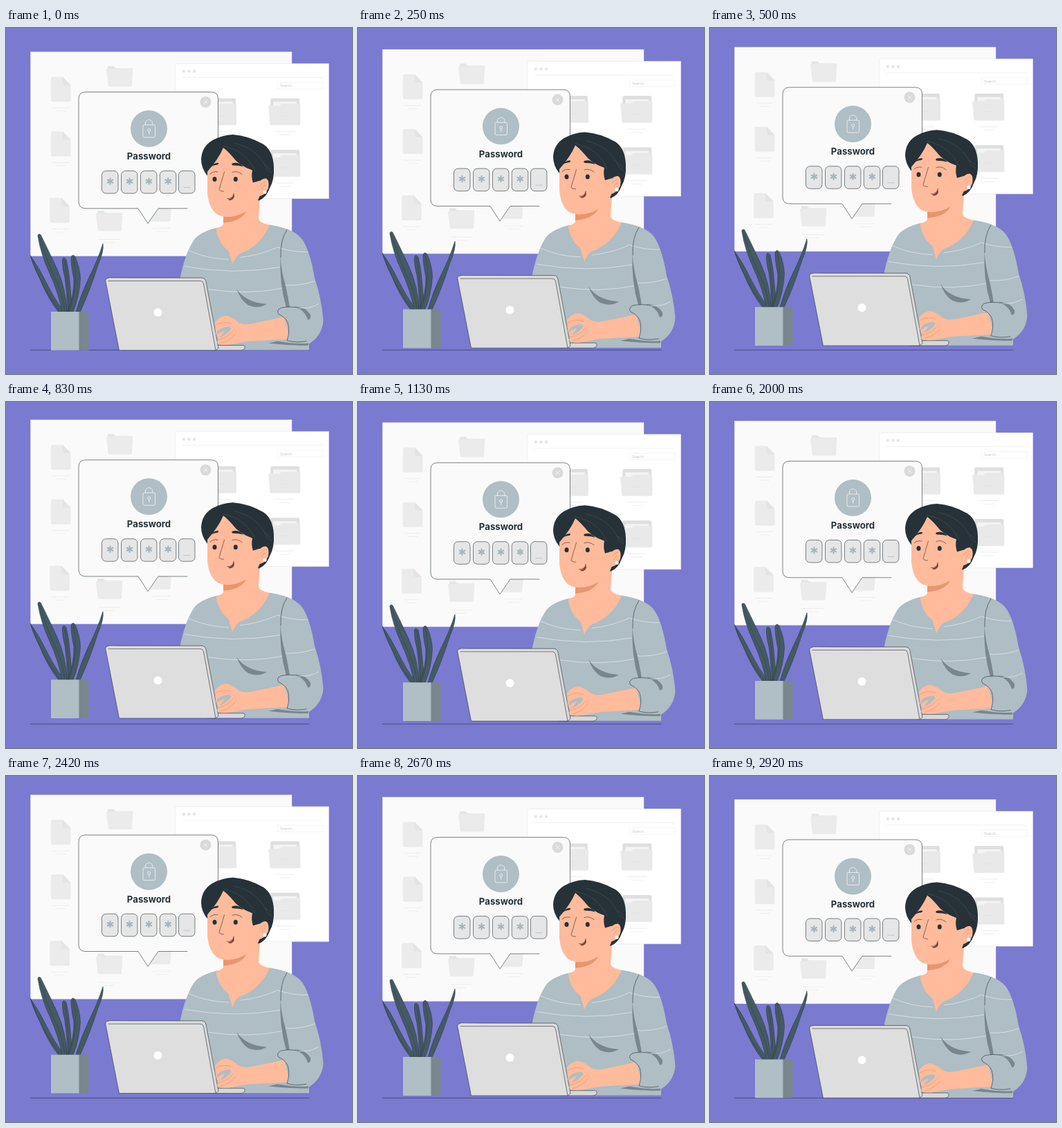
Write an HTML page that moves like this. It is 500 px wide and 500 px high and loops after 2.96 s.

```html
<!DOCTYPE html>
<html lang="en">
<head>
<meta charset="utf-8">
<title>Password</title>
<style>
  html, body { margin: 0; width: 100%; height: 100%; overflow: hidden; background: #7a7ad1; }
  svg { display: block; width: 100%; height: 100%; }
  .ink { fill: none; stroke: #263238; stroke-width: .6; stroke-linecap: round; stroke-linejoin: round; }
  .edge { stroke: #263238; stroke-width: .6; stroke-linejoin: round; }
  .dark { fill: #263238; }
  .skin { fill: #ffbb9b; }
  .shirt { fill: #afbdc4; }
  .shade { fill: #79868d; }
  .stripe { fill: none; stroke: #e6ecef; stroke-width: .7; }
  .rule { stroke: #ebebeb; stroke-width: .9; }
  .leaf { fill: #455a64; stroke: #263238; stroke-width: .5; }
  .white { fill: none; stroke: #fff; stroke-width: .7; }
</style>
</head>
<body>
<svg viewBox="0 0 500 500">
  <defs>
    <g id="file">
      <path fill="#ebebeb" d="M2 0H17L28.500 12V34Q28.500 36 26.500 36H2Q0 36 0 34V2Q0 0 2 0Z"/>
      <path fill="#e4e4e4" d="M17 0V10Q17 12 19 12H28.500Z"/>
      <path class="rule" d="M2 45H26M7 49.500H21"/>
    </g>
    <g id="folder">
      <path fill="#e5e5e5" d="M2 4V1Q2 0 3 0H11L13 3H36V8H2Z"/>
      <path fill="#ebebeb" d="M1 4H14L16 3H37.500Q38.500 3 38.400 4L37 28Q37 29.500 35.500 29.500H4.500Q3 29.500 2.800 28L0 5Q0 4 1 4Z"/>
    </g>
    <g id="docs">
      <path fill="#dfdfdf" d="M5 0H43Q45 0 45 2V37H3V2Q3 0 5 0Z"/>
      <path fill="#f4f4f4" d="M7 5H41V16H7Z"/>
      <path fill="#e9e9e9" d="M1 11H16L19 8H44Q46 8 46 10V37Q46 39 44 39H4Q2 39 2 37L0 12Q0 11 1 11Z"/>
      <path stroke="#e0e0e0" stroke-width=".7" d="M18 26H30"/>
      <path class="rule" d="M10 48H38M16 53H32"/>
    </g>
    <path id="star" d="M0-5V5M-4.400-2.500L4.400 2.500M-4.400 2.500L4.400-2.500" fill="none" stroke="#a6b5bd" stroke-width="2.100"/>
  </defs>

  <path class="ink" d="M35 465.300H438"/>

  <g id="scene">
    <!-- back windows -->
    <path fill="#fafafa" stroke="#e8e8ee" stroke-width=".4" d="M35.500 34H413V329H35.500Z"/>
    <use href="#file" x="65" y="70"/>
    <use href="#file" x="65" y="149"/>
    <use href="#file" x="63.300" y="245"/>
    <use href="#folder" x="145" y="54.500"/>
    <use href="#folder" x="130" y="263.500"/>
    <use href="#folder" x="200.500" y="249.500"/>
    <path class="rule" d="M134 305H165M141 309.500H157M211 289H238M216 293.500H233"/>

    <path fill="#fff" stroke="#e6e6e6" stroke-width=".6" d="M244.500 51H466.500V246H244.500Z"/>
    <g fill="#e6e6e6">
      <circle cx="257" cy="62" r="2.200"/><circle cx="264.500" cy="62" r="2.200"/><circle cx="272" cy="62" r="2.200"/>
    </g>
    <path class="rule" d="M254 71H458" opacity=".7"/>
    <path fill="none" stroke="#ececec" stroke-width=".6" d="M392.500 78H458V87.500H392.500Z"/>
    <text x="396" y="85" font-family="Inter, sans-serif" font-size="5" fill="#c4c4c4">Search...</text>
    <use href="#docs" x="287" y="101"/>
    <use href="#docs" x="379.300" y="101"/>
    <use href="#docs" x="379.300" y="175.500"/>

    <!-- password card -->
    <path fill="#fafafa" d="M115 92H296.500Q306.500 92 306.500 102V260.300H221L205 282L191 260.300H115Q105 260.300 105 250.300V102Q105 92 115 92Z"/>
    <path class="ink" d="M306.500 170V102Q306.500 92 296.500 92H115Q105 92 105 102V250.300Q105 260.300 115 260.300H191L205 282L220 260.300H262"/>
    <circle cx="288.500" cy="106.500" r="8" fill="#dadada"/>
    <path class="white" d="M285.700 103.700L291.300 109.300M291.300 103.700L285.700 109.300"/>
    <circle cx="206.500" cy="145" r="26.500" fill="#b0bec5"/>
    <g class="white">
      <rect x="198" y="139.500" width="17.500" height="18" rx="1.800"/>
      <path d="M201.300 139.500V137.500A5.300 5.300 0 0 1 211.900 137.500V139.500"/>
      <circle cx="206.700" cy="147" r="2"/>
      <path d="M206.700 149V153"/>
    </g>
    <text x="206.500" y="189.700" text-anchor="middle" font-family="Inter, sans-serif" font-weight="700" font-size="13.200" class="dark">Password</text>
    <g id="keys"></g>

    <!-- plant -->
    <path class="leaf" d="M35 328Q39 342 49 362Q60 390 76 410H84Q68 388 58 367Q48 346 35 328Z"/>
    <path class="leaf" d="M46 300Q46 296 50 298Q60 318 73 346Q87 376 88 410H81Q77 385 63 354Q50 326 46 300Z"/>
    <path class="leaf" d="M81.500 334Q83 329 87 334Q91 350 92.500 370L96 410H88Q89 385 85 360Q81 345 81.500 334Z"/>
    <path class="leaf" d="M94 331Q96 325 100 330Q107 346 107.500 362Q106 388 97 410H89Q99 384 98 362Q94 344 94 331Z"/>
    <path class="leaf" d="M140 311Q142 321 133 342Q121 380 107 410H101Q108 385 119 362Q133 334 140 311Z"/>
    <path class="ink" d="M48 300Q60 340 74 368Q83 388 85 409M37 333Q50 372 78 409M85 335Q91 376 91 409M97 330Q106 364 92 409" stroke-width=".4" opacity=".6"/>
    <path fill="#b0bec5" d="M65 409.500H106V465.300H65Z"/>
    <path class="shade" d="M105.500 409.500H119.500V465.300H105.500Z"/>

    <!-- body -->
    <path class="shirt" d="M305 288Q281 294 272 305Q258 326 251 364L290 465H438V456Q457 444 458.500 422Q456 390 446 361Q440 325 430 308Q420 290 382 284Z"/>
    <path class="skin" d="M314 262L314 283Q312 287 303.500 289Q307 311 321 321Q324 329 327 341Q331 331 337 326Q368 315 381 284Q365 281 365 274L368 235Z"/>
    <path fill="#e9966d" d="M314 272Q332 274 347.500 264Q340 279 314 281Z"/>
    <path class="stripe" d="M264 321Q290 333 322 334M338 331Q366 328 391 317M391 316Q415 324 436 323M258 344Q330 357 396 345M400 371Q425 373 446 365M292 377Q350 386 402 375"/>
    <path class="ink" d="M406 291Q396 306 397 331"/>
    <path class="shade" d="M396.500 329Q398 352 404 372Q408 390 410 404L405 403Q395 370 396.500 329Z"/>
    <path class="shade" d="M333 376Q345 396 377 398.500Q364 406 350 400Q339 393 333 376Z"/>
    <path class="shade" d="M392 452Q422 457 437 455L437 458Q420 459 379 455Z"/>

    <!-- laptop -->
    <path class="edge" fill="#d8d8d8" d="M304 458H343Q346.500 459 345 462Q344 465.300 340 465.300H299Z"/>
    <path class="edge" fill="#d8d8d8" d="M148 360.500H283Q288 361 289 366L307 462L303 465.300H290L270 364L147 364Z"/>
    <path fill="#dedede" d="M148 361Q143 361 144 366L163.500 465.300H303L285.500 369Q284.500 363.500 280 363Z"/>
    <path class="ink" d="M148 361Q143 361 144 366L163.500 465.300H303L285.500 369Q284.500 365 281 365H148" stroke-width=".5"/>
    <circle cx="219.500" cy="410.500" r="6" fill="#fff"/>

    <!-- arm -->
    <path class="skin" d="M302 425Q309 416 318 415Q329 418 336 425Q344 429 354 427L402 417L410 449L352 452Q337 454 327 456.500Q315 459 306 456Q304 453 307 450L303 441Z"/>
    <path class="shirt" d="M304 440Q309 432 322 431Q326 432 325 435Q318 444 308 447Q315 440 316 437Q310 438 305 443Z"/>
    <path fill="none" stroke="#e9966d" stroke-width=".7" d="M303 429Q314 422 326 427M307 450Q322 446 328 437M310 455Q325 451 332 441"/>
    <path class="shirt" d="M397 404Q409 401 423 404L450 390Q459 413 458 426Q453 444 433 453Q417 456 406 451Q411 437 407 425Q403 417 394 413Q390 408 397 404Z"/>
    <path class="ink" d="M423 404Q409 401 397 404Q390 408 394 413Q403 417 407 425Q411 437 406 451Q419 455 434 452" stroke-width=".5"/>
    <path class="shade" d="M416 402Q432 401 440 414Q441 421 436 421Q432 407 416 402Z"/>
    <path class="stripe" d="M423 404Q438 406 452 398"/>

    <!-- head -->
    <path class="dark" d="M291 213Q282 202 282 189Q283 171 298 162Q312 154 328 153.500Q350 155 372 167.500Q386 177 387 200Q388 219 381 231Q376 245 365 249L340 222Z"/>
    <path class="skin" d="M314 172.500Q307 189 291 207L291 237Q293 262 307 270Q322 276 342 267Q362 258 367 241L367 220L357 223Q354 214 356 205Q336 198 327 185Q320 177 314 172.500Z"/>
    <path class="skin" d="M364 224Q370 216 376 217Q381 220 379 231Q375 241 365 243Z"/>
    <path fill="none" stroke="#e9966d" stroke-width=".8" d="M367 228Q371 221 376 222M370 233Q371 227 375 227"/>
    <circle cx="374" cy="236.500" r="2.600" fill="#fff"/>
    <path fill="none" stroke="#4a5a62" stroke-width=".5" d="M314 170Q347 177 360 206M330 166Q365 174 377 204L384 209M374 197L383 204"/>
    <path class="dark" d="M296 200Q300 194 307 194.500Q308 197 303 197.500Q299 198 296 200ZM327 195Q336 192 343 200Q337 198 328 198Q325 197 327 195Z"/>
    <path class="ink" d="M295 210.500Q299 206 306 207.500M327 208Q334 205 341 211"/>
    <ellipse class="dark" cx="301.500" cy="218" rx="3" ry="3.500"/>
    <ellipse class="dark" cx="331.800" cy="218" rx="3" ry="3.500"/>
    <path class="ink" d="M315.500 207.500L308 233Q309 235.500 314.500 235.500" stroke-width=".9"/>
    <path fill="#7b4433" d="M321 247Q328 246 329 239Q332 246 325 248.500Q322 249 321 247Z"/>
    <path class="ink" d="M319.500 246Q327.500 247 329.300 238.500" stroke-width=".8"/>
  </g>
</svg>
<script>
  const keyX = [138.5, 166.5, 194.5, 222.3, 249.5];
  document.getElementById('keys').innerHTML = keyX.map((x, i) =>
    `<rect class="edge" x="${x}" y="206" width="23.500" height="32.500" rx="6" fill="#e6e6e6"/>` +
    (i < 4
      ? `<use href="#star" x="${x + 12}" y="221"/>`
      : `<path stroke="#b0bec5" stroke-width=".8" d="M${x + 7} 230H${x + 17}"/>`)
  ).join('');

  // The whole scene drifts 10 units up and back at a steady speed.
  document.getElementById('scene').animate(
    [{ transform: 'translateY(.5px)' }, { transform: 'translateY(-9.5px)' }],
    { duration: 740, direction: 'alternate', iterations: Infinity, easing: 'linear' }
  );
</script>
</body>
</html>
```
